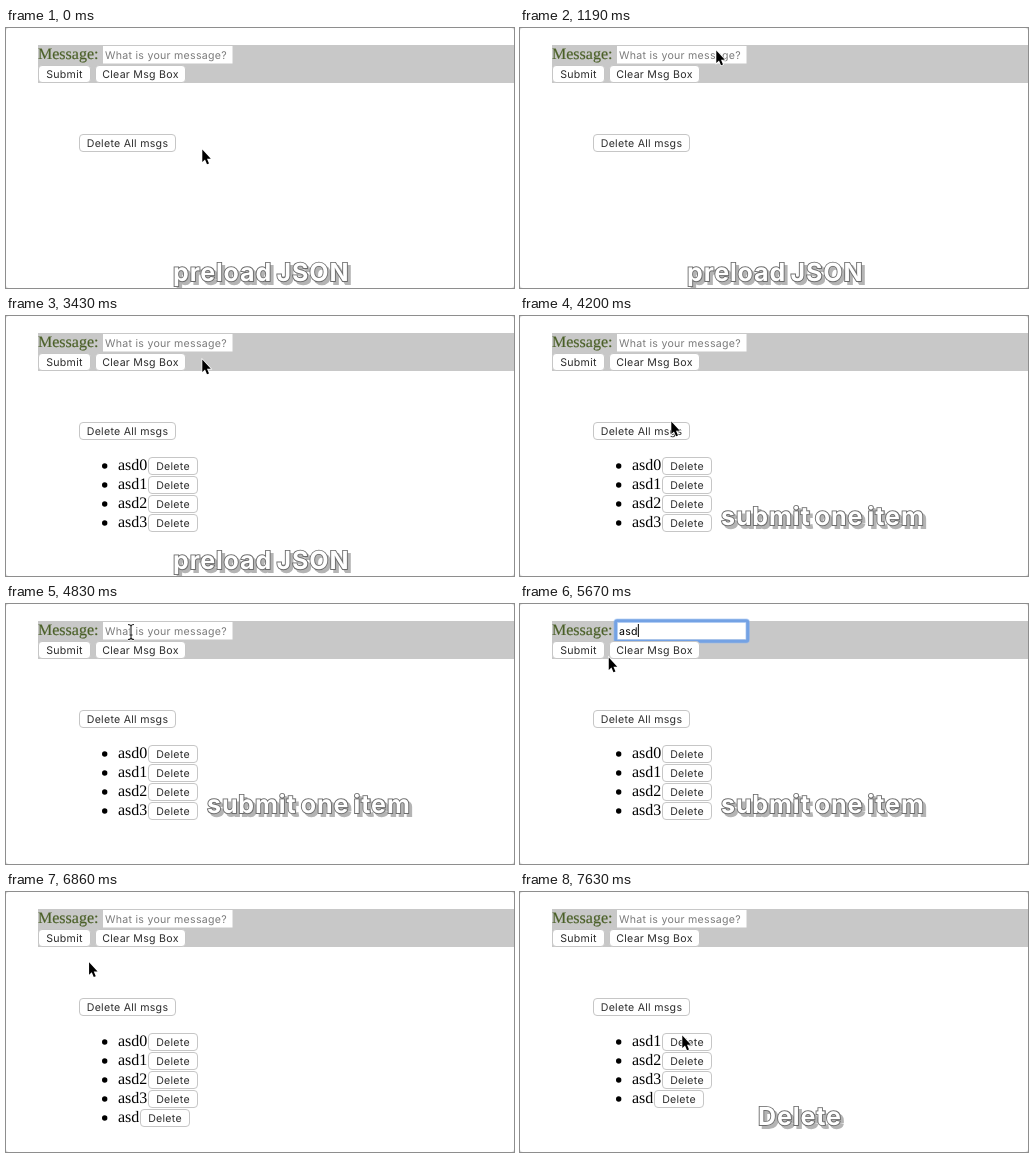
Write an HTML page that moves like this. It is 508x260 px and loops after 8 s.

```html
<!DOCTYPE html>
<html lang="en">
<head>
<meta charset="utf-8">
<title>Message list</title>
<style>
  html, body { margin: 0; width: 100%; height: 100%; overflow: hidden; background: #fff; }
  svg { display: block; width: 100vw; height: 100vh; text-rendering: geometricPrecision; }
  .page { font: 16px "Liberation Serif", serif; }
  .ui { font: 10.6px Inter, sans-serif; letter-spacing: .27px; }
  .btn rect { fill: #fff; stroke: #c6c6c6; }
  .btn text { text-anchor: middle; fill: #2c2c2c; }
  .ring { fill: none; stroke: #74a2e4; stroke-width: 3; }
  .glow { fill: none; stroke: #8fb8f2; stroke-width: 4.6; opacity: .5; }
  .caption {
    font: 700 25px Inter, sans-serif; letter-spacing: .9px; word-spacing: -2.5px;
    fill: #fff; stroke: #6c6c6c; stroke-width: 1.8; paint-order: stroke;
    filter: drop-shadow(3px 3px .5px #b4b4b4);
  }
</style>
</head>
<body>
<svg viewBox="0 0 508 260">
  <rect width="508" height="260" fill="#d4d4d4"/>
  <rect width="508" height="260" rx="3" fill="#fff"/>
  <rect x="32" y="17" width="476" height="38" fill="#c8c8c8"/>
  <text class="page" x="32" y="31" fill="#4b6028" stroke="#4b6028" stroke-width=".2">Message:</text>
  <rect x="97" y="18" width="129.5" height="17.5" fill="#fff"/>
  <g id="inputRing"></g>
  <text id="field" class="ui" x="99" y="31"></text>
  <path id="caret" stroke="#000" d="M0 20V33"/>
  <g id="clearRing"></g>
  <g id="buttons"></g>
  <g id="lists"></g>
  <g id="captions"></g>
  <path id="arrow" d="M.3 .5V13L3 10.4L5 15.2L7 14.4L5 9.7H8.8Z"
        stroke="#fff" stroke-width="1.4" paint-order="stroke"/>
  <g id="beam" fill="none">
    <path id="bar" d="M-3-7.5Q0-7.5 0-5.5Q0-7.5 3-7.5M0-6V6M-3 7.5Q0 7.5 0 5.5Q0 7.5 3 7.5M-1.5 3H1.5"
          stroke="#fff" stroke-width="2.4"/>
    <use href="#bar"/>
  </g>
</svg>
<script>
const LOOP = 8000, TICK = 70;
const $ = id => document.getElementById(id);
const show = (el, on) => el.setAttribute("display", on ? "inline" : "none");
const within = (t, a, b) => t >= a && t < b;

const button = (x, y, w, label) =>
  `<g class="btn ui"><rect x="${x + .5}" y="${y + .5}" width="${w - 1}" height="17" rx="3.5"/>
   <text x="${x + w / 2}" y="${y + 13}">${label}</text></g>`;

const ring = (x, y, w, h, r) => ["glow", "ring"].map(c =>
  `<rect class="${c}" x="${x}" y="${y}" width="${w}" height="${h}" rx="${r}"/>`).join("");

const row = (name, i) => {
  const y = 141 + 19 * i;
  return `<circle cx="98.7" cy="${y + 9}" r="2.7"/>
    <text class="page" x="112" y="${y + 13}">${name}</text>` +
    button(name.length > 3 ? 142 : 134, y, 50, "Delete");
};

const caption = (text, x, y) => `<text class="caption" x="${x}" y="${y}">${text}</text>`;

$("buttons").innerHTML = button(32, 37, 53, "Submit") +
  button(89, 37, 91, "Clear Msg Box") + button(73, 106, 97, "Delete All msgs");
$("inputRing").innerHTML = ring(95.7, 16.7, 132, 20.5, 1.5);
$("clearRing").innerHTML = ring(88.2, 36.2, 92.6, 19.6, 5);
$("beam").lastElementChild.style.cssText = "stroke: #222";
$("bar").removeAttribute("stroke");
$("bar").removeAttribute("stroke-width");
$("beam").innerHTML = ["stroke:#fff;stroke-width:2.4", "stroke:#222;stroke-width:1.1"]
  .map(style => `<path style="${style}" d="${$("bar").getAttribute("d")}"/>`).join("");

const saved = [0, 1, 2, 3].map(n => "asd" + n);
const scenes = {
  lists: [
    { from: 3430, to: 6230, html: saved.map(row).join("") },
    { from: 6230, to: 7630, html: [...saved, "asd"].map(row).join("") },
    { from: 7630, to: LOOP, html: [...saved.slice(1), "asd"].map(row).join("") }
  ],
  captions: [
    { from: 0, to: 3710, html: caption("preload JSON", 167, 253) },
    { from: 3710, to: 6440, html: caption("submit one item", 201, 209) },
    { from: 7140, to: LOOP, html: caption("Delete", 238, 233) }
  ]
};
for (const id in scenes)
  $(id).innerHTML = scenes[id].map(s => `<g>${s.html}</g>`).join("");

// Pointer stops: leave, arrive, x, y and sideways bow of the path.
const home = [196, 121];
const stops = [
  [0, 490, 196, 22, 140],
  [1190, 1960, 212, 22, -20],
  [1960, 2030, 225.5, 32, 0],
  [3150, 3220, 214, 36, 0],
  [3290, 3430, 196, 43, 0],
  [3570, 3850, 148, 122, 0],
  [3920, 4200, 151, 105, 24],
  [4340, 4830, 125, 28, 20],
  [5460, 5950, 65, 47, 15],
  [6790, 7420, 162, 143, -6]
];

function pointer(t) {
  let [x, y] = home;
  for (const [a, b, endX, endY, bow] of stops) {
    if (t <= a) break;
    const u = Math.min(1, (t - a) / (b - a)), ease = 1 - (1 - u) ** 2;
    const dx = endX - x, dy = endY - y;
    const side = bow * Math.sin(Math.PI * ease) / Math.hypot(dx, dy);
    x += dx * ease + dy * side;
    y += dy * ease - dx * side;
  }
  return [x, y];
}

function draw(time) {
  const t = Math.floor((time % LOOP + .01) / TICK) * TICK;

  const focused = within(t, 5040, 6230);
  const letters = Math.min(3, Math.max(0, Math.floor((t - 5040) / 105)));
  const typed = focused ? "asd".slice(0, letters) : "";
  $("field").textContent = typed || "What is your message?";
  $("field").setAttribute("fill", typed ? "#000" : "#7b7b7b");
  const caretX = 99.5 + (typed ? $("field").getComputedTextLength() : 0);
  $("caret").setAttribute("transform", `translate(${caretX})`);
  show($("caret"), focused);
  show($("inputRing"), focused);
  show($("clearRing"), within(t, 2310, 3220));

  for (const id in scenes)
    scenes[id].forEach((s, i) => show($(id).children[i], within(t, s.from, s.to)));

  const beam = within(t, 2030, 3220) || within(t, 4830, 5180);
  const hidden = within(t, 5180, 5530);
  const place = `translate(${pointer(t)})`;
  show($("beam"), beam);
  show($("arrow"), !beam && !hidden);
  $("beam").setAttribute("transform", place);
  $("arrow").setAttribute("transform", place);
}

const start = performance.now();
function loop() {
  draw(performance.now() - start);
  requestAnimationFrame(loop);
}
loop();
</script>
</body>
</html>
```
